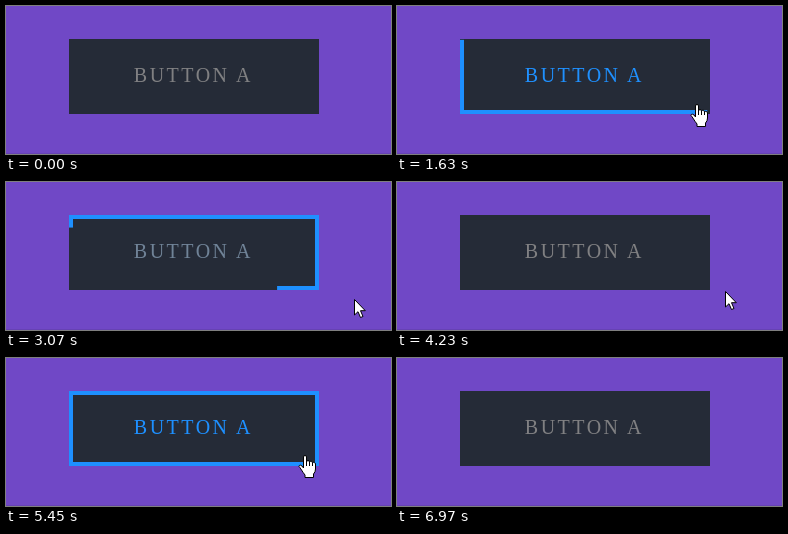
An HTML page that plays this animation: 385 px wide and 148 px high, repeating every 7360 ms.

```html
<!DOCTYPE html>
<html lang="en">
<head>
<meta charset="utf-8">
<title>Border button</title>
<style>
  html, body { margin: 0; height: 100%; overflow: hidden; background: #7048c6; }
  svg { display: block; width: 385px; height: 148px; }
  text { font: 20px "Liberation Serif", "Times New Roman", serif; letter-spacing: 2.5px; }
  #lines { fill: #1e90ff; }
  #cursor path { fill: #fff; stroke: #000; stroke-linejoin: round; }
</style>
</head>
<body>
<svg viewBox="0 0 385 148">
  <rect y="147" width="385" height="1" fill="#6642b4"/>
  <rect x="63" y="33" width="250" height="75" fill="#252b37"/>
  <g id="lines">
    <rect id="bottom" y="104" height="4"/>
    <rect id="left" x="63" width="4"/>
    <rect id="top" y="33" height="4"/>
    <rect id="right" x="309" width="4"/>
  </g>
  <text id="label" x="127.8" y="76">BUTTON A</text>
  <g id="cursor">
    <path id="arrow" d="M.5 .5V16L4 12.7L6.5 18.5L9 17.5L6.5 11.7H11.3Z"/>
    <path id="hand" transform="translate(-7)" d="M5.5 13V2Q5.5 .5 7 .5T8.5 2V7Q8.7 5.5 10 5.5T11.5 7Q12 6 13.2 6.2T14.5 8Q15 7 16.2 7.4T17.5 9V14Q17.5 17 15.5 19V22.5H7V20Q5 17.5 3.5 15T1 11.5Q1 10 2.5 10.2T5.5 13ZM8.5 7V11M11.5 7V11M14.5 8V11"/>
  </g>
</svg>
<script>
const LOOP = 7360, STAGE = 500;
const hovers = [[1200, 2805], [4450, 5955]];
// time, x, y of the pointer tip
const route = [
  [880, 348, 151], [1200, 312, 108], [1250, 308, 106], [1640, 300, 98],
  [2720, 300, 98], [2805, 312, 107], [3070, 348, 117], [4140, 348, 117],
  [4230, 328, 109], [4450, 312, 106], [4870, 299, 97], [5790, 299, 97],
  [5955, 312, 108], [6400, 345, 124], [6520, 345, 124], [6900, 347, 150]
];
const el = id => document.getElementById(id);
const set = (id, attrs) => {
  for (const name in attrs) el(id).setAttribute(name, attrs[name]);
};

// cubic-bezier(.25, .1, .25, 1)
function ease(x) {
  if (x <= 0) return 0;
  if (x >= 1) return 1;
  const curve = (u, a, b) => 3 * u * (1 - u) ** 2 * a + 3 * u * u * (1 - u) * b + u ** 3;
  let low = 0, high = 1;
  for (let i = 0; i < 24; i++) {
    const mid = (low + high) / 2;
    if (curve(mid, .25, .25) < x) low = mid; else high = mid;
  }
  return curve(low, .1, 1);
}

function pointerAt(t) {
  const i = route.findIndex(stop => stop[0] > t);
  if (i < 1) return [400, 160];
  const [t0, x0, y0] = route[i - 1], [t1, x1, y1] = route[i];
  const k = (t - t0) / (t1 - t0);
  return [x0 + (x1 - x0) * k, y0 + (y1 - y0) * k];
}

// Both lines of a pair fill, then empty, away from the bottom left corner.
function drawPair(across, upright, from, to) {
  set(across, { x: 63 + 250 * from, width: 250 * (to - from) });
  set(upright, { y: 108 - 75 * to, height: 75 * (to - from) });
}

function draw(t) {
  const [start, end] = hovers[t < 4140 ? 0 : 1];
  const progress = since => ease((t - since) / STAGE);
  drawPair("bottom", "left", progress(end), progress(start));
  drawPair("top", "right", progress(end + STAGE), progress(start + STAGE));

  const blue = progress(start) - progress(end);
  const mix = (a, b) => Math.round(a + (b - a) * blue);
  set("label", { fill: `rgb(${mix(128, 30)},${mix(128, 144)},${mix(130, 255)})` });

  const hovered = t >= start && t < end;
  set("hand", { visibility: hovered ? "visible" : "hidden" });
  set("arrow", { visibility: hovered ? "hidden" : "visible" });
  set("cursor", { transform: `translate(${pointerAt(t).map(Math.round)})` });
}

const began = performance.now();
function tick() {
  draw((performance.now() - began) % LOOP);
  requestAnimationFrame(tick);
}
tick();
</script>
</body>
</html>
```
